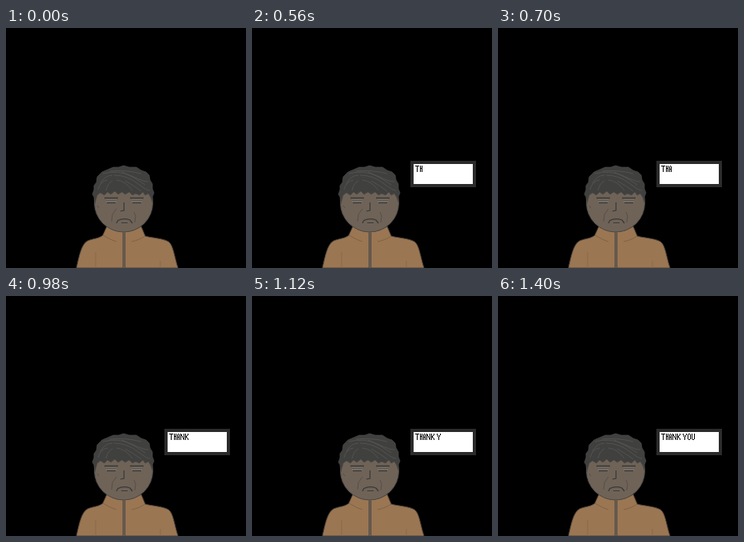
Write an HTML page with a canvas that moves like this. It is 300x300 px and loops after 1540 ms.

```html
<!DOCTYPE html>
<html lang="en">
<head>
<meta charset="utf-8">
<title>Thank you</title>
<style>
  html, body { margin: 0; width: 100%; height: 100%; overflow: hidden; background: #000; }
  canvas { display: block; width: 300px; height: 300px; }
</style>
</head>
<body>
<canvas id="stage" width="300" height="300" role="img" aria-label="A tired man says: THANK YOU"></canvas>
<script>
const ctx = document.getElementById('stage').getContext('2d');
const LOOP = 1540, STEP = 140;
const INK = '#3a3937';

// Pixel lettering: each letter is a few rectangles (x, y, w, h), 8 px tall.
const GLYPHS = {
  T: ['0 0 5 1', '2 0 1 8'],
  H: ['0 0 1 8', '2 0 1 8', '1 3 1 1'],
  A: ['0 1 1 7', '2 1 1 7', '1 0 1 1', '1 4 1 1'],
  N: ['0 0 1 8', '4 0 1 8', '1 1 1 2', '2 3 1 2', '3 5 1 2'],
  K: ['0 0 1 8', '3 0 1 2', '2 2 1 1', '1 3 1 2', '2 5 1 1', '3 6 1 2'],
  Y: ['0 0 1 2', '4 0 1 2', '1 2 1 2', '3 2 1 2', '2 4 1 4'],
  O: ['0 1 1 6', '3 1 1 6', '1 0 2 1', '1 7 2 1'],
  U: ['0 0 1 7', '3 0 1 7', '1 7 2 1']
};
const ADVANCE = { T: 6, H: 4, A: 4, N: 6, K: 5, ' ': 2, Y: 6, O: 5, U: 5 };

function fill(d, color) {
  ctx.fillStyle = color;
  ctx.fill(new Path2D(d));
}

function line(d, color = INK, width = 1) {
  ctx.strokeStyle = color;
  ctx.lineWidth = width;
  ctx.stroke(new Path2D(d));
}

function drawJacket() {
  const body = 'M88 300C91 287 94 270 102 266C109 263 117 263 121 259' +
    'L126 248Q147 262 169 248L174 260C180 262 197 263 203 267' +
    'C209 271 210 284 215 300Z';
  fill(body, '#9b7653');
  line(body, '#4b4138');
  line('M121 259C125 261 131 265 138 267M174 260C170 263 163 266 157 267', '#7b5c40', 0.8);
  line('M112 300V280M193 300V291', '#84654a', 0.7);
  line('M146.5 256V300M148.5 256V300', INK);
  line('M147.5 256V300', '#8b8073');
}

function drawHead() {
  ctx.beginPath();
  ctx.ellipse(147, 218.5, 36.5, 36.5, 0, 0, Math.PI * 2);
  ctx.fillStyle = '#6f6358';
  ctx.fill();
  ctx.strokeStyle = '#4c4a47';
  ctx.lineWidth = 1;
  ctx.stroke();

  const hair = 'M111 220L110 211L108 208L110 202L110 197L113 193L114 186' +
    'L120 180L127 177L134 174L141 174L147 172L154 174L163 174L169 178' +
    'L175 180L179 184L180 190L183 195L183 201L185 206L183 211' +
    'L183 218L181 212L178 207L174 209L171 205L167 209L162 207L158 209L154 205' +
    'L149 208L145 205L140 208L136 204L131 208L127 205L123 209L118 206L114 209Z';
  fill(hair, '#40403f');
  line(hair, '#4c4a47', 0.7);
  line('M121 182Q140 177 157 185T178 192M130 179Q149 177 169 182' +
    'M135 184Q151 184 164 194T180 203M145 180Q160 186 174 196' +
    'M118 194Q124 184 133 184M115 202Q118 191 127 190M125 203Q127 194 133 191' +
    'M138 190Q149 191 158 203M149 191Q160 197 169 204', '#5c5b59', 0.7);
}

function drawEye(x) {
  ctx.fillStyle = '#7b736b';
  ctx.fillRect(x + 2, 214, 13, 4);
  line(`M${x} 212.5H${x + 17}`, INK, 1.6);
  line(`M${x + 2} 215.5H${x + 15}`, '#5a534d');
  line(`M${x + 3} 218.5H${x + 14}`, INK, 1.4);
}

function drawFeatures() {
  drawEye(123);
  drawEye(155);
  line('M147.5 218V228L143 229', INK, 1.2);
  line('M138 244L140 240.5Q147 237 155 240L158 244', INK, 1.3);
  line('M144 243.5H152', INK);
  line('M138 226L133 233L132 242M160 230L162 235L161 243M114 222L116 225', '#514a44', 0.8);
}

function drawText(text) {
  ctx.fillStyle = '#000';
  let x = 204;
  for (const ch of text) {
    for (const part of GLYPHS[ch] || []) {
      const [dx, dy, w, h] = part.split(' ').map(Number);
      ctx.fillRect(x + dx, 172 + dy, w, h);
    }
    x += ADVANCE[ch];
  }
}

function drawBubble(count) {
  ctx.fillStyle = '#2b2b2b';
  ctx.fillRect(198, 166, 82, 33);
  ctx.fillStyle = '#fff';
  ctx.fillRect(202, 170, 74, 25);
  drawText('THANK YOU'.slice(0, count));
}

function draw(now) {
  const t = now % LOOP;
  ctx.fillStyle = '#000';
  ctx.fillRect(0, 0, 300, 300);
  drawJacket();
  drawHead();
  drawFeatures();
  if (t >= 280) {
    // The first letter holds for two steps; the space shares a step with Y.
    const typed = t < 560 ? 1 : Math.floor(t / STEP) - 2;
    drawBubble(typed > 5 ? typed + 1 : typed);
  }
}

const start = performance.now();
function tick() {
  draw(performance.now() - start);
  requestAnimationFrame(tick);
}
tick();
</script>
</body>
</html>
```
